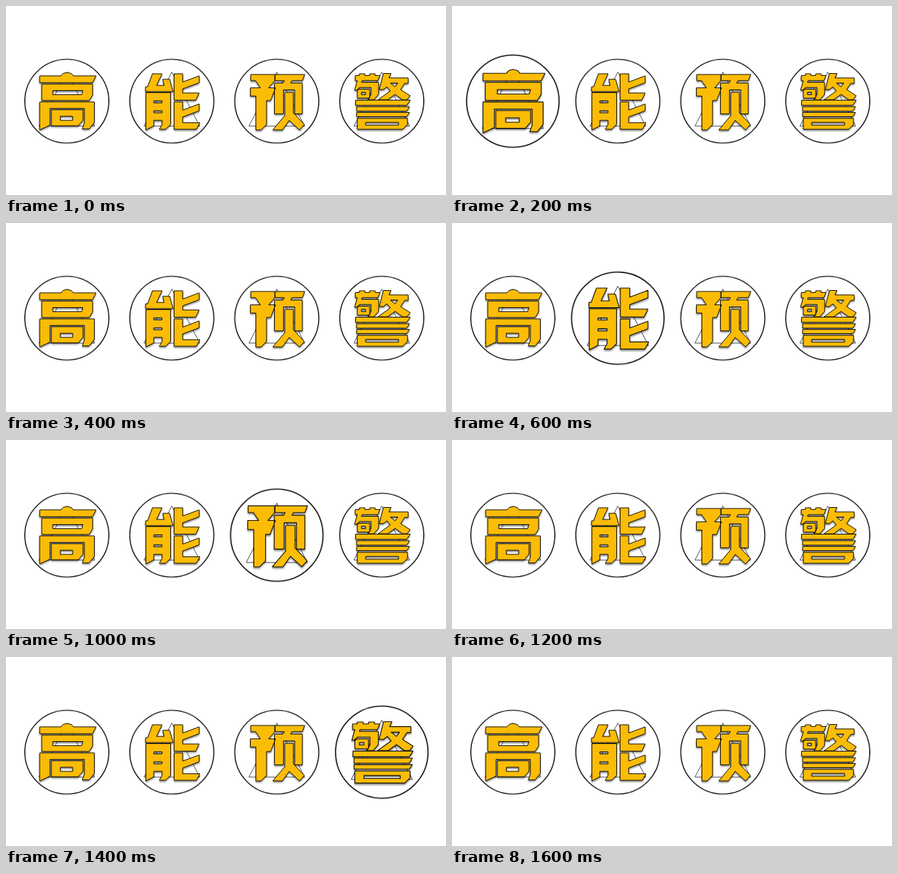
These frames come from a looping animation (640 by 276 pixels, 1.8 s). An HTML page:

```html
<!DOCTYPE html>
<html lang="zh">
<head>
<meta charset="utf-8">
<title>高能预警</title>
<style>
  html, body { margin: 0; width: 100%; height: 100%; overflow: hidden; background: #fff; }
  svg { display: block; width: 640px; height: 276px; }
  /* The stepped size is a custom property, so lines are redrawn sharp at each scale. */
  .badge {
    --size: 1;
    transform: scale(var(--size));
    transform-origin: calc(88.5px + var(--i) * 152.7px) 139px;
    animation: pop 1.8s calc(var(--i) * .4s) step-end infinite;
  }
  .glyph {
    fill: #fbbc05;
    fill-rule: evenodd;
    stroke: #0c0a02;
    stroke-width: 1;
    stroke-linejoin: round;
    filter: drop-shadow(.4px 2px .8px rgba(0, 0, 0, .45));
  }
  @keyframes pop {
    0% { --size: 1; }
    11.1111% { --size: 1.1; }
    22.2222%, 100% { --size: 1; }
  }
</style>
</head>
<body>
<svg viewBox="0 0 640 276" role="img" aria-label="高能预警">
  <defs>
    <g id="sign" fill="none">
      <circle cx="88.5" cy="139" r="62.1" fill="#fff" stroke="#aaa" stroke-width=".9"/>
      <circle cx="88.5" cy="139" r="61" stroke="#000" stroke-width="1.2"/>
      <path d="M88.5 96.5L129 175.3H48Z" stroke="#222" stroke-width=".8"/>
    </g>
  </defs>

  <g class="badge" style="--i:0">
    <use href="#sign"/>
    <path class="glyph" d="M49 102H80L83 98.5Q88.5 95.5 95 98.5L98 102H131L126 112H49Z
      M52 114H126V130L121 138H52Z M68 123.5H112L110 129.5H68Z
      M49 140H128.5V170L121 179.5H111L114 171V149.5H64V174L49 181Z
      M66 151.5H112V167L105 175H66Z M79 161H97V167H79Z"/>
  </g>

  <g class="badge" style="--i:1">
    <use href="#sign" x="152.7"/>
    <path class="glyph" d="M213 99H227L219 116H230L228 107H238L243 125H203V118H206Z
      M203.5 126.5H239.5V173L232 180H223L227 173V167H215V175L203.5 181Z
      M215 138.5H227V141.5H215Z M215 153H227V156H215Z
      M244.5 99H257V111L281 102V112L257 121V127H281L276 137.5H244.5Z
      M244.5 140H257V152L281 143V153L257 162V170.5H282L277 180H244.5Z"/>
  </g>

  <g class="badge" style="--i:2">
    <use href="#sign" x="305.4"/>
    <path class="glyph" d="M356 100H391V109L382 119.5H392L385 138H379V173L371 181H363.5V131.5H355.5V119.5H370L363 109H356Z
      M391.5 100H434.5L431 109H416L414 112.5H431V157.5H420V122.5H403.5V157.5H390.5V112.5H403L405 109H391.5Z
      M405.5 126H418V156L434 173L427 181L412 167L402 181H388L405.5 160Z"/>
  </g>

  <g class="badge" style="--i:3">
    <use href="#sign" x="458.1"/>
    <path class="glyph" d="M508 101.5H514V99H522V101.5H529V99H537V101.5H544L541 109H518L517 111.5H542V129L535 137H527L531 129V119H514L512 123H507L511 109H508Z
      M511 121.5H529V134.5H511Z M517 126H523V129.5H517Z
      M549 98.5H560L557 105H585V113H580L574 122L588 131L583 137H577L566 129L555 137H541L559 124L554 118L549 122H543Z
      M559 112.5H570L566 118Z"/>
    <path class="glyph" d="M508.5 137.5H588L583 145H508.5Z M510 147H587L583 153.5H510Z M510 155.5H587L583 161.5H510Z
      M511 164H584V173L577 180H511Z M523 170H571V174H523Z"/>
  </g>
</svg>
</body>
</html>
```
